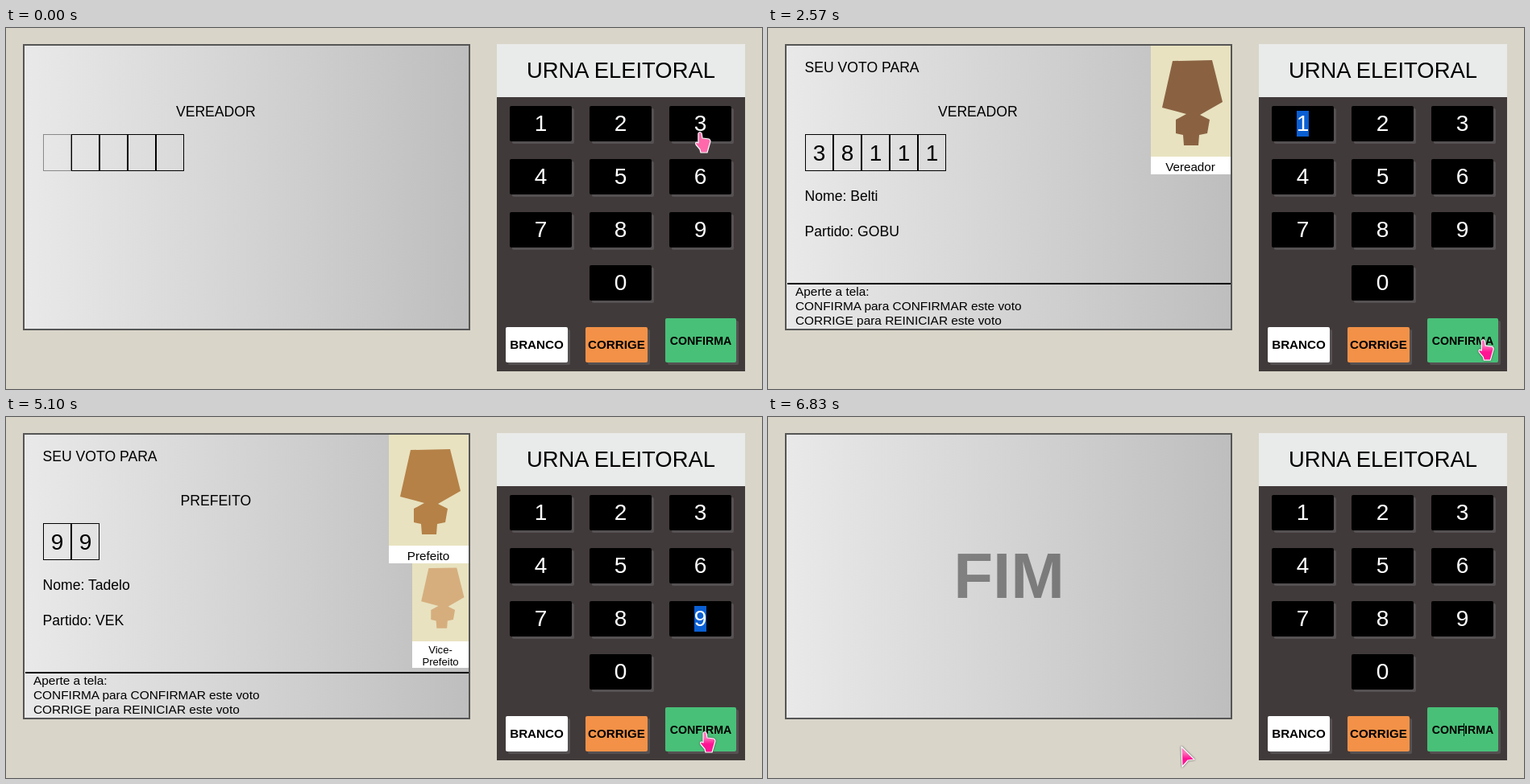
An HTML page that plays this animation: 938x449 px, repeating every 6910 ms.

```html
<!DOCTYPE html>
<html lang="pt-BR">
<head>
<meta charset="utf-8">
<title>Urna eleitoral</title>
<style>
  html, body { margin: 0; height: 100%; overflow: hidden; background: #d9d5c9; }
  svg { display: block; width: 100%; height: 100%; font-family: "Liberation Sans", Arial, sans-serif; }
  #pointer { filter: drop-shadow(0 0 1px #444); stroke: #fff; stroke-width: 1.2; stroke-linejoin: round; }
</style>
</head>
<body>
<svg viewBox="0 0 938 449">
  <defs>
    <linearGradient id="glass"><stop stop-color="#e9e9e9"/><stop offset="1" stop-color="#bebebe"/></linearGradient>
    <linearGradient id="pink" x2="0" y2="1">
      <stop offset=".3" stop-color="#ff72ba"/><stop offset=".6" stop-color="#ff1493"/>
    </linearGradient>
    <path id="person" d="M502 41L551 40 564 92 536 108 548 114 545 131 535 133 534 146 516 146 515 133 506 131 506 114 519 107 489 99Z"/>
  </defs>
  <rect x="22" y="21" width="553" height="354" fill="url(#glass)" stroke="#555" stroke-width="2"/>
  <g id="screen"></g>
  <g id="panel"></g>
  <g id="marks"></g>
  <path id="pointer"/>
</svg>
<script>
const LOOP = 6910, FRAMES = 87;
const $ = id => document.getElementById(id);

const rect = (x, y, w, h, fill, more = '') =>
  `<rect x="${x}" y="${y}" width="${w}" height="${h}" fill="${fill}" ${more}/>`;
const text = (x, y, size, str, more = '') =>
  `<text x="${x}" y="${y}" font-size="${size}" ${more}>${str}</text>`;
const MID = 'text-anchor="middle"', BOLD = MID + ' font-weight="bold"';

// Keypad
const keys = [];
for (let i = 0; i < 10; i++) {
  const col = i < 9 ? i % 3 : 1, row = Math.floor(i / 3);
  keys.push({ x: 625 + 99 * col, y: 97 + 66 * row, w: 77, h: 44, fill: '#000', label: (i + 1) % 10, size: 28, base: 31 });
}
keys.push(
  { x: 620, y: 372, w: 77, h: 44, fill: '#fff', label: 'BRANCO', size: 15.2, base: 27 },
  { x: 719, y: 372, w: 77, h: 44, fill: '#f29147', label: 'CORRIGE', size: 15.2, base: 27 },
  { x: 818, y: 361, w: 88, h: 55, fill: '#48c078', label: 'CONFIRMA', size: 14.2, base: 33 });

const keyLabel = k => text(k.x + k.w / 2, k.y + k.base, k.size, k.label,
  k.size === 28 ? MID + ' fill="#fff"' : BOLD);

$('panel').innerHTML = rect(609, 20, 308, 407, '#413a3a') + rect(609, 20, 308, 66, '#e9ebea') +
  text(763, 62, 27.4, 'URNA ELEITORAL', MID) +
  keys.map(k => rect(k.x + 3, k.y + 3, k.w, k.h, '#555152', 'rx="2"') +
    rect(k.x, k.y, k.w, k.h, k.fill, 'rx="2"') + keyLabel(k)).join('');

// Pointer path: frame, x, y
const path = [
  [0, 861, 130], [2, 861, 130], [9, 776, 249], [10, 776, 249], [15, 683, 139], [18, 670, 125],
  [23, 670, 125], [27, 907, 379], [28, 910, 386], [29, 910, 386], [36, 857, 391], [37, 857, 391],
  [39, 858, 388], [41, 858, 386], [46, 872, 249], [49, 872, 249], [55, 870, 382], [59, 867, 392],
  [64, 867, 392], [66, 863, 394], [68, 863, 394], [73, 700, 416], [76, 657, 414], [77, 652, 413], [86, 512, 410]];
const HAND = 'M-2 1q2-3 4 0l1 6 8 1q2 1 2 3l-2 7-2 7h-8l-1-4-5-6q-1-3 1-3l2 1z';
const ARROW = 'M1 0L17 16 9 17 2 25Z';

function pointerAt(f) {
  const i = Math.max(1, path.findIndex(p => p[0] >= f));
  const [f0, x0, y0] = path[i - 1], [f1, x1, y1] = path[i];
  const u = (f - f0) / (f1 - f0);
  return [x0 + (x1 - x0) * u, y0 + (y1 - y0) * u];
}

// Key presses: frame, key index
const presses = [[2, 2], [11, 7], [19, 0], [21, 0], [22, 0], [38, 12], [46, 8], [49, 8], [69, 12]];
const CONFIRM = 12;
const pulse = n => 0.65 - 0.35 * Math.cos(n * Math.PI / 4);

const offices = [
  { title: 'VEREADOR', caption: 'Vereador', slots: 5, name: 'Belti', party: 'GOBU', skin: '#8a6242' },
  { title: 'PREFEITO', caption: 'Prefeito', slots: 2, name: 'Tadelo', party: 'VEK', skin: '#b58147', vice: true }];

function fields(digits, slots, since) {
  let out = '';
  for (let i = 0; i < slots; i++) {
    const on = i < digits.length, x = 46 + 35 * i;
    const y = on && digits.length < slots ? 146 : 132;
    const alpha = i === digits.length ? pulse(since) : 1;
    out += rect(x + .5, y + .5, 34, 45, 'none', `stroke="#000" opacity="${alpha}"`);
    if (on) out += text(x + 17.5, y + 32.5, 28, digits[i], MID);
  }
  return out;
}

function candidate(o) {
  let out = text(45.5, 55, 17.6, 'SEU VOTO PARA') +
    text(45.5, 215, 17.6, 'Nome: ' + o.name) + text(45.5, 259, 17.6, 'Partido: ' + o.party) +
    rect(24, 317, 550, 2, '#000') +
    ['Aperte a tela:', 'CONFIRMA para CONFIRMAR este voto', 'CORRIGE para REINICIAR este voto']
      .map((s, i) => text(34, 333 + 18 * i, 15.4, s)).join('') +
    rect(475, 22, 99, 138, '#e8e2c0') + `<use href="#person" fill="${o.skin}"/>` +
    rect(475, 160, 99, 22, '#fff') + text(524, 178, 15.2, o.caption, MID);
  if (o.vice) out += rect(504, 182, 70, 97, '#e8e2c0') +
    '<use href="#person" fill="#d6ae7e" transform="translate(168 159) scale(.71)"/>' +
    rect(504, 279, 70, 33, '#fff') + text(539, 294, 13.1, 'Vice-', MID) + text(539, 309, 13.1, 'Prefeito', MID);
  return out;
}

function drawScreen(f) {
  let stage = 0, digits = '', last = -1;
  for (const [at, key] of presses) {
    if (at > f) break;
    last = at;
    if (key === CONFIRM) { stage++; digits = ''; }
    else digits += keys[key].label;
  }
  if (stage === 2) return text(299, 225, 80, 'FIM', `${BOLD} opacity="${pulse(f - last)}"`);
  const o = offices[stage];
  return text(260.3, 110, 17.6, o.title, MID) + fields(digits, o.slots, f - last) +
    (digits.length === o.slots ? candidate(o) : '');
}

// Text caret after one press, selected label after a repeated press
function drawMarks(f) {
  const done = presses.filter(p => p[0] <= f);
  if (!done.length) return '';
  const [at, index] = done[done.length - 1], k = keys[index], mid = k.x + k.w / 2;
  if (done.length > 1 && done[done.length - 2][1] === index)
    return rect(mid - 7.5, k.y + 6, 15, 32, '#0a5fd3') + keyLabel(k);
  if (Math.floor((f - at) / 6.5) % 2) return '';
  if (index !== CONFIRM) return rect(Math.floor(mid + 7), k.y + 6, 1, 31, '#fff');
  return at > 60 ? rect(863, 381, 1, 16, '#000') : '';
}

function drawPointer(f) {
  const [x, y] = pointerAt(f);
  const over = keys.some(k => x >= k.x && x < k.x + k.w && y >= k.y && y < k.y + k.h);
  const pale = f < 3 || (f > 36 && f < 42);
  const p = $('pointer');
  p.setAttribute('d', over ? HAND : ARROW);
  p.setAttribute('fill', pale ? '#ff69ab' : 'url(#pink)');
  p.setAttribute('transform', `translate(${x} ${y})`);
}

let shown = -1;
function tick(now) {
  const f = Math.floor(now % LOOP * FRAMES / LOOP + .02) % FRAMES;
  if (f !== shown) {
    shown = f;
    $('screen').innerHTML = drawScreen(f);
    $('marks').innerHTML = drawMarks(f);
    drawPointer(f);
  }
  requestAnimationFrame(tick);
}
tick(performance.now());
</script>
</body>
</html>
```
